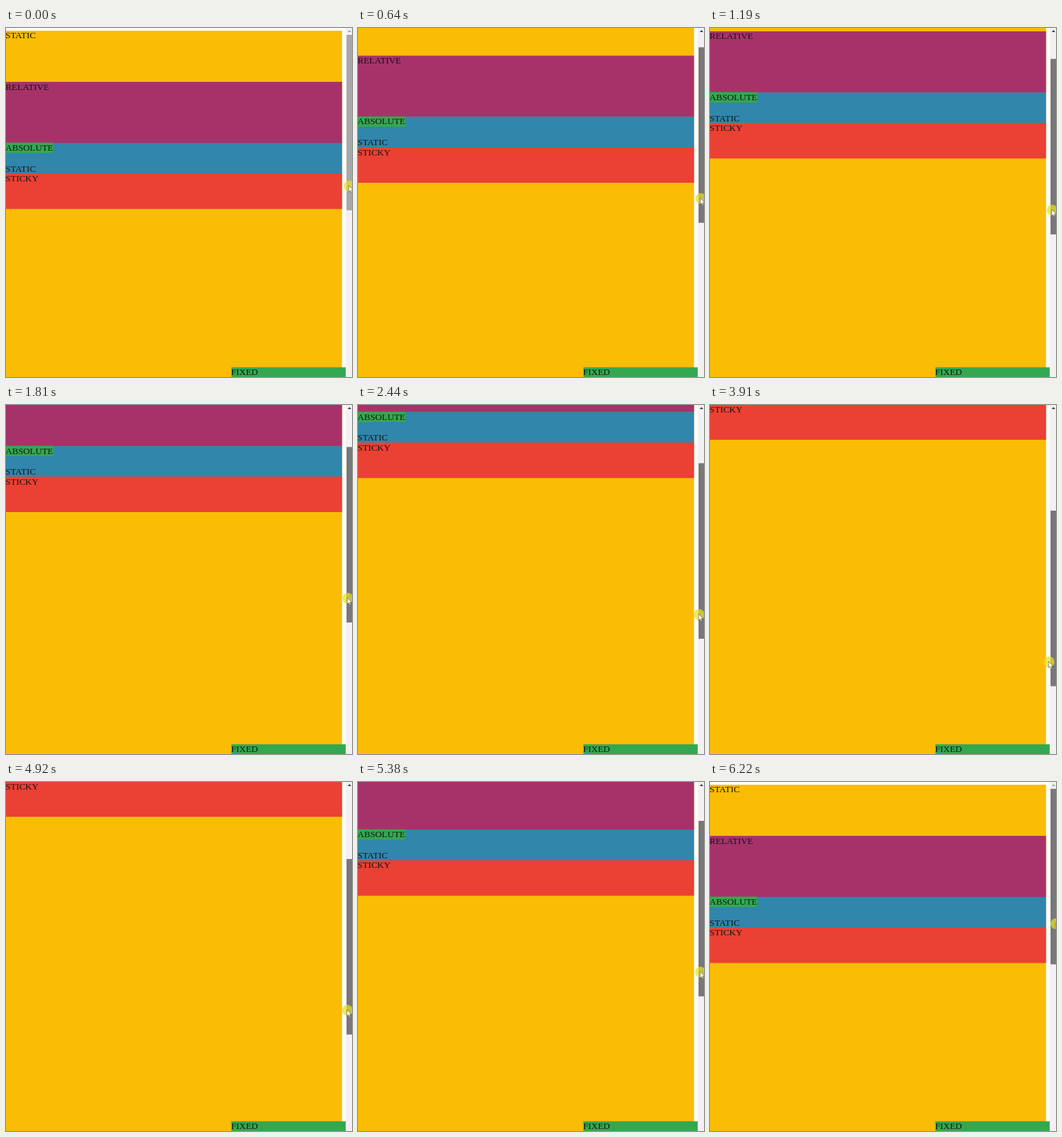
An HTML page that plays this animation: 508 by 512 pixels, repeating every 6.32 s.

```html
<!DOCTYPE html>
<html lang="en">
<head>
<meta charset="utf-8">
<title>CSS positions</title>
<style>
  html, body { margin: 0; width: 100%; height: 100%; overflow: hidden; background: #fff; }
  svg { display: block; width: 100vw; height: 100vh; }
  text { font: 13.4px "Liberation Serif", "Times New Roman", serif; fill: #141414; }
</style>
</head>
<body>
<svg id="stage" viewBox="0 0 508 512"></svg>
<script>
const NS = "http://www.w3.org/2000/svg";
const LOOP = 6320, PRESS = 100, TURN = 4290;
const TOP = 10, RATIO = 2.1, STICK = -1, STICKY_Y = 213.5, WIDTH = 493.4;
const YELLOW = "#fbbc05", PURPLE = "#a7326a", BLUE = "#3086ab", RED = "#eb4034", GREEN = "#34a850";

// Each pull of the scrollbar: first step, last step, thumb position reached
const PULLS = [
  [320, 410, 26.5], [640, 640, 28.3], [1040, 1260, 50], [1420, 1420, 51],
  [1740, 2130, 78], [2440, 3050, 126], [3130, 3210, 128.5], [3440, 3910, 155],
  [TURN, 4610, 124], [4840, 4920, 113], [5000, 5380, 57], [5450, 5530, 41],
  [5920, 6220, -14]
];
const STEP = 78, SLACK = 10;

const stage = document.getElementById("stage");

function add(tag, attrs, parent = stage) {
  const el = document.createElementNS(NS, tag);
  for (const key in attrs) el.setAttribute(key, attrs[key]);
  parent.appendChild(el);
  return el;
}
const rect = (x, y, width, height, fill, parent) => add("rect", { x, y, width, height, fill }, parent);
function label(str, x, top, parent) {
  add("text", { x, y: top + 11.3 }, parent).textContent = str;
}
const move = (el, x, y) => el.setAttribute("transform", `translate(${x} ${y})`);

// Thumb position: every pull advances in discrete, slightly slowing steps
function dragAt(t) {
  let pos = TOP;
  for (const [start, end, goal] of PULLS) {
    if (t < start) break;
    const gaps = Math.round((end - start) / STEP);
    const gap = (end - start) / gaps || STEP;
    const done = Math.min(gaps, Math.floor((t - start + SLACK) / gap)) + 1;
    pos += (goal - pos) * (done / (gaps + 1)) ** 0.85;
  }
  return pos;
}

// The hand drifts left on the way down and swings right on the way up
const pointerX = (t, pos) => t < TURN
  ? 504 - 0.042 * (pos - TOP)
  : 508 - 0.6 * Math.sqrt(pos + 14);

const page = add("g", {});
rect(0, 4, WIDTH, 1000, YELLOW, page);
label("STATIC", -0.7, 4, page);
rect(0, 79, WIDTH, 90, PURPLE, page);
label("RELATIVE", -0.7, 79.2, page);
rect(0, 168.7, WIDTH, 45.3, BLUE, page);
rect(0, 168.2, 69.6, 15.2, GREEN, page);
label("ABSOLUTE", -0.7, 168.6, page);
label("STATIC", -0.7, 199.5, page);

const sticky = add("g", {});
rect(0, 0, WIDTH, 52, RED, sticky);
label("STICKY", -0.7, 0.2, sticky);

rect(498.7, 0, 10, 512, "#f1f1f1");
const arrow = add("path", { d: "M501.6 6 L504.3 3 L507 6 Z" });
const thumb = rect(500, 0, 8, 257.5, "#a8a8a8");

rect(331, 497.7, 167.8, 15, GREEN);
label("FIXED", 330.6, 498);

const pointer = add("g", {});
add("circle", { r: 8, fill: "#e8e020", "fill-opacity": 0.72 }, pointer);
add("path", {
  d: "M-.8 -1 V8.5 L1.4 6.5 L2.9 9.9 L4.5 9.2 L3 5.9 H5.9 Z",
  fill: "#fff", stroke: "#444", "stroke-width": 0.6
}, pointer);

function draw(t) {
  const pos = dragAt(t);
  const top = Math.max(TOP, pos);
  const scroll = (top - TOP) * RATIO;
  move(page, 0, -scroll);
  move(sticky, 0, Math.max(STICK, STICKY_Y - scroll));
  thumb.setAttribute("y", top);
  thumb.setAttribute("fill", t < PRESS ? "#a8a8a8" : "#787878");
  arrow.setAttribute("fill", scroll > 0 ? "#404040" : "#a3a3a3");
  move(pointer, pointerX(t, pos), pos + 222);
}

const start = performance.now();
function tick() {
  draw((performance.now() - start) % LOOP);
  requestAnimationFrame(tick);
}
tick();
</script>
</body>
</html>
```
